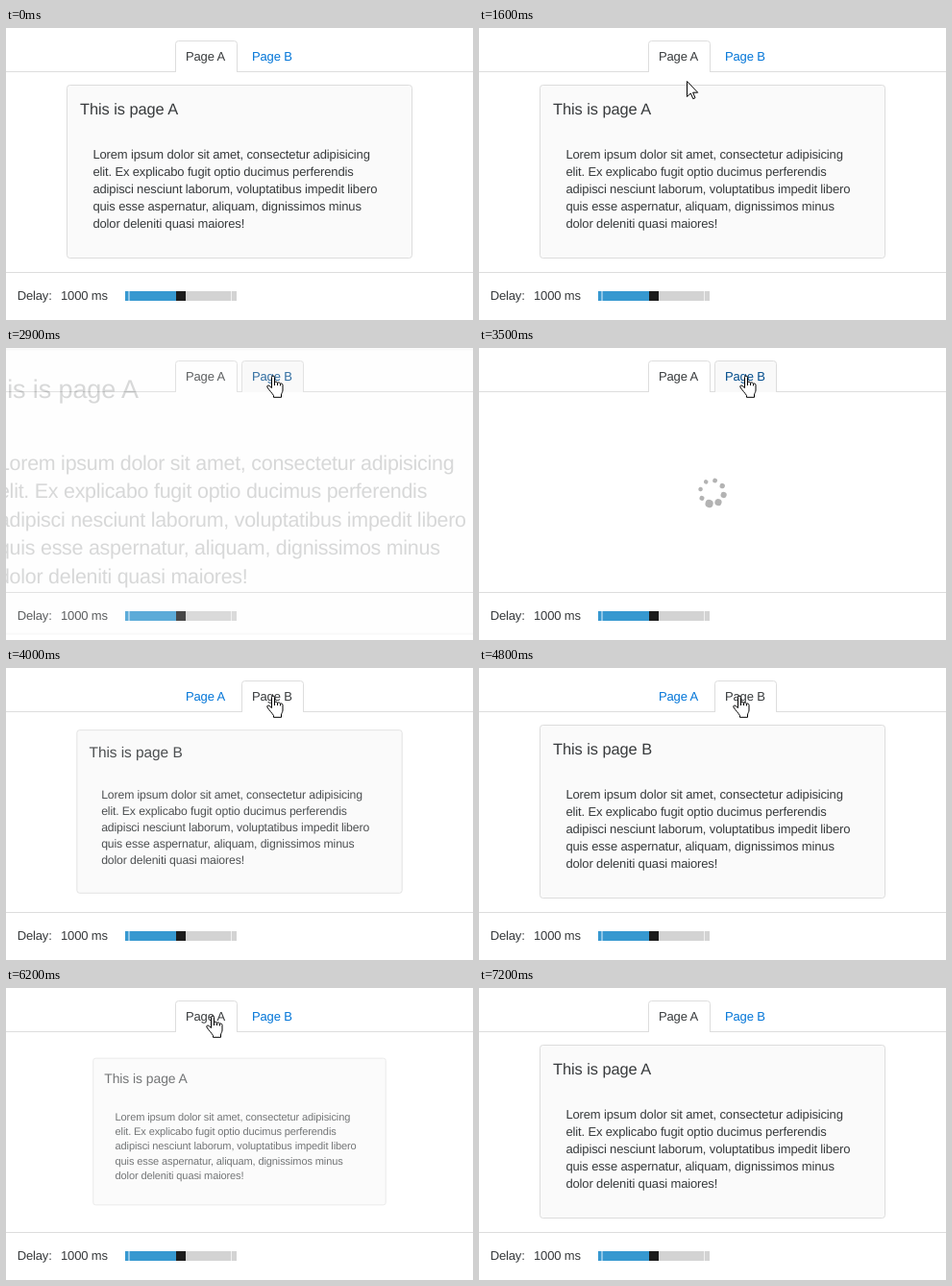
An HTML page that plays this animation: 486x304 px, repeating every 8200 ms.

```html
<!DOCTYPE html>
<html lang="en">
<head>
<meta charset="utf-8">
<title>Page transition</title>
<style>
  html, body { margin: 0; width: 100%; height: 100%; overflow: hidden; background: #fff; }
  svg { display: block; width: 486px; height: 304px; }
  text { font: 13px "Liberation Sans", Arial, sans-serif; letter-spacing: -.14px; fill: #373a3c; text-rendering: geometricPrecision; white-space: pre; }
  .title { font-size: 16.4px; letter-spacing: -.06px; }
  .rule { stroke: #ddd; }
  .tab path { fill: none; stroke: none; }
  .tab text { fill: #0275d8; }
  .tab.hover .shape { fill: #f9f9f9; stroke: #ddd; }
  .tab.hover text { fill: #014c8c; }
  .tab.active .shape { fill: #fff; stroke: #ddd; }
  .tab.active .base { stroke: #fff; }
  .tab.active text { fill: #373a3c; }
  #card rect { fill: #fafafa; stroke: #ddd; }
  #loader { fill: #b3b3b3; }
  #cursor path { fill: #fff; stroke: #000; stroke-linejoin: round; }
  #cursor .crease { fill: none; }
</style>
</head>
<body>
<svg viewBox="0 0 486 304">
  <path class="rule" d="M0 45.5H486M0 254.5H486"/>

  <g class="tab" transform="translate(176 0)">
    <path class="shape" d="M.5 46V16.5a3 3 0 0 1 3-3h58a3 3 0 0 1 3 3V46"/>
    <path class="base" d="M1 45.5h63"/>
    <text x="11" y="34">Page A</text>
  </g>
  <g class="tab" transform="translate(245 0)">
    <path class="shape" d="M.5 46V16.5a3 3 0 0 1 3-3h58a3 3 0 0 1 3 3V46"/>
    <path class="base" d="M1 45.5h63"/>
    <text x="11" y="34">Page B</text>
  </g>

  <text x="11.7" y="283">Delay:</text>
  <text x="57" y="283">1000 ms</text>
  <g id="slider">
    <rect x="124" y="274" width="116" height="10" fill="#d3d3d3"/>
    <rect x="124" y="274" width="53" height="10" fill="#3698d0"/>
    <rect x="177" y="274" width="10" height="10" fill="#1c1c1c"/>
    <rect x="127" y="274" width="2" height="10" fill="#8cc4e6"/>
    <rect x="234" y="274" width="1" height="10" fill="#f0f0f0"/>
  </g>

  <g id="loader"></g>

  <g id="card">
    <rect x="63.5" y="59.5" width="359" height="180" rx="3"/>
    <text class="title" x="77" y="90"></text>
    <text x="90.4" y="135.6">Lorem ipsum dolor sit amet, consectetur adipisicing</text>
    <text x="90.4" y="153.6">elit. Ex explicabo fugit optio ducimus perferendis</text>
    <text x="90.4" y="171.6">adipisci nesciunt laborum, voluptatibus impedit libero</text>
    <text x="90.4" y="189.6">quis esse aspernatur, aliquam, dignissimos minus</text>
    <text x="90.4" y="207.6">dolor deleniti quasi maiores!</text>
  </g>

  <g id="cursor">
    <path id="arrow" d="M.5 .5V16.5L4.3 13 6.8 18.7 9 17.7 6.6 12.2H11.7Z"/>
    <g id="hand" transform="translate(-7 -1)">
      <path d="M5.5 13.5V2.5a1.5 1.5 0 0 1 3 0V8c0-1.2 3-1.2 3 .5c0-1 3-.8 3 .9c.3-.8 2.5-.6 2.5 1.1V16c0 2-1.5 3-1.5 5v2.3H7.5V21.5C6 19 3 16 1 13c-1-1.7 1-2.6 2-1.6z"/>
      <path class="crease" d="M8.5 8v3M11.5 8.5v2.5M14.5 9.4v2"/>
    </g>
  </g>
</svg>

<script>
const LOOP = 8200, STEP = 100, LEAD = 20;
const FADE = 500;
const GROWN = 1.8, SHRUNK = 0.5;

const visits = [
  { click: 2648, arrive: 3700, page: 1 },
  { click: 5367, arrive: 5995, page: 0 }
];

// Pointer hot spot: time, x, y
const route = [
  [900, 369, 258], [1500, 209, 72], [1700, 223, 37], [1800, 227, 29],
  [2000, 227, 29], [2500, 278, 29], [4700, 278, 29], [4800, 271, 29],
  [5300, 215, 29], [6300, 215, 29], [6500, 209, 42], [7100, 69, 239]
];

const $ = id => document.getElementById(id);
const tabs = [...document.querySelectorAll('.tab')];
const tabLeft = [176, 245];
const card = $('card'), loader = $('loader'), cursor = $('cursor');
const title = card.querySelector('.title');

[4.1, 3.6, 3.1, 2.7, 2.4, 2.3, 2.3, 2.5].forEach((r, i) => {
  const dot = document.createElementNS('http://www.w3.org/2000/svg', 'circle');
  const a = -i * Math.PI / 4;
  dot.setAttribute('cx', 12.4 * Math.cos(a));
  dot.setAttribute('cy', 12.4 * Math.sin(a));
  dot.setAttribute('r', r);
  loader.append(dot);
});

const show = (el, on) => el.setAttribute('visibility', on ? 'inherit' : 'hidden');
const mix = (a, b, p) => a + (b - a) * p;

// The CSS "ease" curve, cubic-bezier(.25, .1, .25, 1)
function ease(x) {
  if (x <= 0) return 0;
  if (x >= 1) return 1;
  const bez = (a, b, u) => 3 * a * u * (1 - u) ** 2 + 3 * b * u * u * (1 - u) + u ** 3;
  let lo = 0, hi = 1;
  for (let i = 0; i < 24; i++) {
    const mid = (lo + hi) / 2;
    if (bez(.25, .25, mid) < x) lo = mid; else hi = mid;
  }
  return bez(.1, 1, lo);
}

function pointer(t) {
  const i = route.findIndex(k => k[0] > t);
  if (i < 1) return route[i < 0 ? route.length - 1 : 0].slice(1);
  const [t0, x0, y0] = route[i - 1], [t1, x1, y1] = route[i];
  const p = (t - t0) / (t1 - t0);
  return [mix(x0, x1, p), mix(y0, y1, p)];
}

function draw(t) {
  let page = 0, scale = 1, alpha = 1, loading = false;
  for (const v of visits) {
    if (t >= v.arrive) {
      const p = ease((t - v.arrive) / FADE);
      page = v.page;
      scale = mix(SHRUNK, 1, p);
      alpha = p;
      loading = false;
    } else if (t >= v.click) {
      const p = ease((t - v.click) / FADE);
      scale = mix(1, GROWN, p);
      alpha = 1 - p;
      loading = p === 1;
    }
  }

  card.setAttribute('transform', `translate(243 149.5) scale(${scale}) translate(-243 -149.5)`);
  card.setAttribute('opacity', alpha);
  title.textContent = 'This is page ' + 'AB'[page];

  show(loader, loading);
  loader.setAttribute('transform', `translate(242.6 150) rotate(${104 + (t - 3500) * 0.36})`);

  const visible = t >= 900 && t < 7200;
  const [x, y] = pointer(t);
  let overTab = false;
  tabs.forEach((tab, i) => {
    const over = visible && y >= 13 && y < 46 && x >= tabLeft[i] && x < tabLeft[i] + 65;
    overTab = overTab || over;
    tab.classList.toggle('active', i === page);
    tab.classList.toggle('hover', over && i !== page);
  });
  show(cursor, visible);
  show($('hand'), overTab);
  show($('arrow'), !overTab);
  cursor.setAttribute('transform', `translate(${Math.round(x)} ${Math.round(y)})`);
}

const start = performance.now();
function tick() {
  const t = (performance.now() - start + LEAD) % LOOP;
  draw(Math.floor(t / STEP) * STEP);
  requestAnimationFrame(tick);
}
tick();
</script>
</body>
</html>
```
